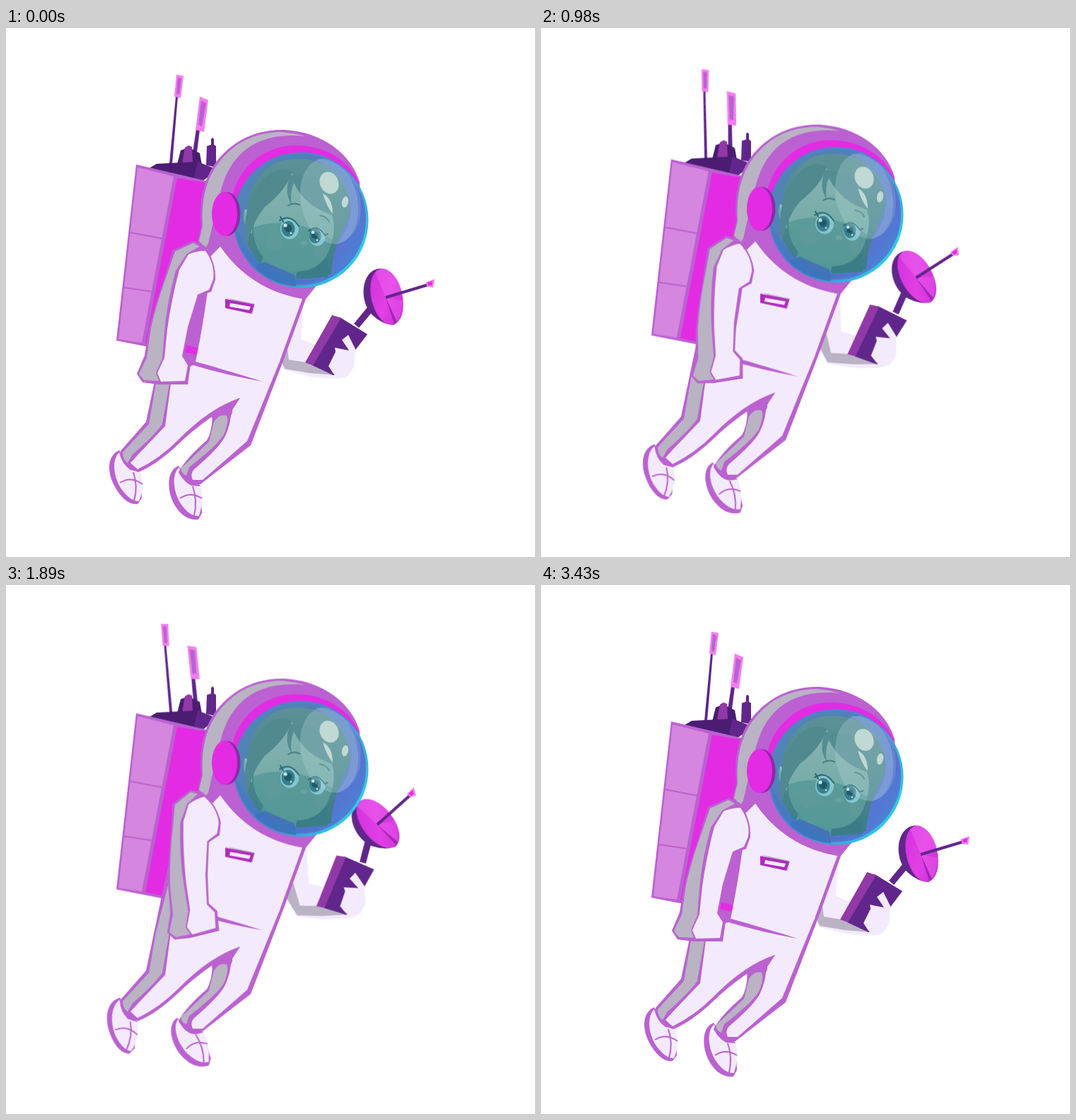
Write an HTML page without scripts that moves like this. It is 748 px wide and 748 px high and loops after 3.5 s.

```html
<!DOCTYPE html>
<html lang="en">
<head>
<meta charset="utf-8">
<title>Floating astronaut</title>
<style>
html, body { margin: 0; width: 100%; height: 100%; overflow: hidden; background: #fff; }
svg { display: block; width: 100vw; height: 100vh; }

.float, .swing { animation: 3.5s linear infinite; }
.float { animation-name: float; }
.swing { animation-name: swing; }
.open, .shut { animation: open 3.5s step-end infinite; }
.shut { animation-name: shut; }

.aerial-a { --turn: -11.2deg; transform-origin: 233px 191px; }
.aerial-b { --turn: -15deg; transform-origin: 267px 172px; }
.near-arm { --turn: -15.5deg; transform-origin: 265px 320px; }
.far-arm { --turn: -9deg; transform-origin: 380px 356px; }
.dish { --turn: -19deg; transform-origin: 497px 418px; }
.left-boot { --turn: 10.5deg; transform-origin: 172px 603px; }
.right-boot { --turn: -15deg; transform-origin: 262px 630px; }

/* Up and back again, with a short rest before the loop restarts. */
@keyframes float { 0%, 98%, 100% { transform: translateY(0); } 49% { transform: translateY(-13px); } }
@keyframes swing { 0%, 98%, 100% { transform: rotate(0); } 49% { transform: rotate(var(--turn)); } }
@keyframes open { 0%, 54% { opacity: 1; } 44% { opacity: 0; } }
@keyframes shut { 0%, 54% { opacity: 0; } 44% { opacity: 1; } }

.white { fill: #f3ebfd; }
.purple { fill: #bb61d1; }
.lilac { fill: #d586de; }
.hot { fill: #e32be3; }
.pink { fill: #f47df0; }
.grey { fill: #b9b3c4; }
.dark { fill: #61268b; }
.deep { fill: #4a1d73; }
.plum { fill: #9139a6; }
.line { fill: none; stroke: #bb61d1; stroke-width: 2; }
.rod { fill: none; stroke: #61268b; }
.lash { fill: none; stroke: #2b6874; stroke-width: 2; stroke-linecap: round; }
</style>
</head>
<body>
<svg viewBox="0 0 748 748">
  <defs>
    <linearGradient id="glass" x1="0" y1="0" x2="1" y2=".8">
      <stop offset="0" stop-color="#4f8ab4"/>
      <stop offset=".45" stop-color="#537cbc"/>
      <stop offset=".8" stop-color="#5873cf"/>
      <stop offset="1" stop-color="#4a83d8"/>
    </linearGradient>
    <linearGradient id="rim" x1="0" y1="0" x2="1" y2=".6">
      <stop offset="0" stop-color="#5c78c6"/>
      <stop offset=".6" stop-color="#4a86d2"/>
      <stop offset="1" stop-color="#2fc8e6"/>
    </linearGradient>
    <linearGradient id="hair" x1="0" y1="0" x2="0" y2="1">
      <stop offset="0" stop-color="#5d9197"/>
      <stop offset="1" stop-color="#3c7c86"/>
    </linearGradient>
    <linearGradient id="skin" x1="0" y1="0" x2="0" y2="1">
      <stop offset="0" stop-color="#88b4b1"/>
      <stop offset="1" stop-color="#68a5a1"/>
    </linearGradient>
    <linearGradient id="bowl" x1="0" y1="0" x2="1" y2="1">
      <stop offset="0" stop-color="#cf2fdc"/>
      <stop offset=".5" stop-color="#e23fe4"/>
      <stop offset="1" stop-color="#c52ad3"/>
    </linearGradient>
    <clipPath id="pane"><ellipse cx="417" cy="271.500" rx="93.500" ry="94"/></clipPath>
    <clipPath id="face"><path id="head" d="M350 290C349 266 360 244 384 230Q398 220 404 205Q420 246 460 263Q468 281 459 307C451 337 426 348 400 343C372 338 353 319 350 290Z"/></clipPath>
  </defs>

  <g class="float">
    <!-- Pack -->
    <g class="swing aerial-a">
      <path class="dark" d="M231 192L240 97H243L235 192Z"/>
      <path class="pink" d="M241 66L251 68L247 99L238 97Z"/>
      <path class="purple" d="M243 70L248 71L245 94L241 93Z"/>
    </g>
    <g class="swing aerial-b">
      <path class="dark" d="M264 176L269 143L274 144L270 176Z"/>
      <path class="pink" d="M274 97L286 102L280 147L268 144Z"/>
      <path class="purple" d="M276 103L283 106L277 139L272 137Z"/>
    </g>
    <path class="dark" d="M284 167L290 165V157L292 155L294 157V165L297 167V197L283 194Z"/>
    <path class="deep" d="M242 193L247 173L258 169L274 177L277 194Z"/>
    <path class="plum" d="M249 191L253 169L258 166L263 168L264 191Z"/>
    <path class="deep" d="M203 198L213 192L271 189L297 202L277 217Z"/>
    <path class="dark" d="M271 189L296 199L277 217L266 211Z"/>
    <path class="purple" d="M184 193L287 217V300L222 455L156 442Z"/>
    <path class="lilac" d="M186 197L237 210L192 445L159 440Z"/>
    <path class="hot" d="M242 212L284 219L278 300L221 451L197 446Z"/>
    <path class="line" d="M175 289L222 298M167 367L208 373"/>

    <!-- Far arm and hand dish -->
    <g class="swing far-arm">
      <path class="white" d="M385 372L421 380L417 440L435 447L470 450L491 458Q496 478 483 492Q472 499 430 493L394 484L376 440Z"/>
      <path class="grey" d="M391 420L395 435L400 469L438 475L466 491L430 488L394 482L376 440Z"/>
      <g class="swing dish">
        <path class="dark" d="M492 418L511 395L519 400L499 424Z"/>
        <path class="dark" d="M530 340C502 341 498 386 518 406Q533 420 549 420Z"/>
        <ellipse cx="538.500" cy="380" rx="22" ry="40.500" transform="rotate(-13 538.500 380)" fill="url(#bowl)"/>
        <path d="M537 381L522 345L530 340Q551 343 560 371Z" fill="#f06bf1" opacity=".4"/>
        <path d="M537 381L561 386Q560 410 550 417Z" fill="#f06bf1" opacity=".35"/>
        <path d="M537 381L553 416L549 419Z" fill="#a127b5"/>
        <path class="rod" stroke-width="4" d="M537 381L597 363"/>
        <path class="pink" d="M593 360L606 355L604 367L596 366Z"/>
        <path class="hot" d="M596 360L603 358L602 364L597 364Z"/>
      </g>
      <path class="dark" d="M472 409L511 433L492 458L463 491L433 477Z"/>
      <path class="plum" d="M461 406L474 410L434 477L423 473Z"/>
      <path class="white" d="M463 489L456 478L466 458L465 452L485 456L475 441L484 434L494 454L492 480L481 492Z"/>
    </g>

    <!-- Boots -->
    <g class="swing left-boot">
      <path class="purple" d="M160 597C143 605 143 627 152 645C162 665 175 675 186 673L192 665L190 626L175 618Z"/>
      <path class="white" d="M160 600C149 611 152 636 164 653Q177 670 188 669Q192 660 194 646L190 627L176 625Q164 617 160 600Z"/>
      <path class="line" stroke-width="1.500" d="M161 643Q177 633 193 645M180 628Q187 648 181 669"/>
    </g>
    <g class="swing right-boot">
      <path class="purple" d="M244 619C228 625 227 650 236 670C245 688 258 697 272 695L277 686L275 647L260 640Z"/>
      <path class="white" d="M245 621C233 632 237 658 248 674Q260 691 273 690Q277 677 278 663L275 648L262 647Q248 640 245 621Z"/>
      <path class="line" stroke-width="1.500" d="M246 665Q261 655 277 665M264 648Q271 668 266 690"/>
    </g>

    <!-- Suit -->
    <path class="purple" d="M285 300L424 383L393 468L346 590L275 645Q257 652 244 628Q254 609 284 583Q291 572 292 549Q262 570 242 590Q212 618 187 628Q164 622 162 598L198 557L228 414L250 350Z"/>
    <path class="grey" d="M232 425L247 430L231 503L221 560Q209 577 179 603L172 615Q165 611 165 600L202 560L212 503Z"/>
    <path class="white" d="M233 503L256 480L267 476L364 490L388 469L341 584L278 639L264 639Q260 630 266 624Q300 595 309 579Q319 558 318 541L331 523Q288 537 243 583Q217 609 186 624L176 615L185 605L225 563Z"/>
    <path class="purple" d="M331 523Q310 531 290 549L294 556L303 548L315 552Q321 545 320 540Z"/>
    <path class="grey" d="M294 557Q301 545 312 548Q316 555 308 575Q298 591 259 621L255 633Q246 629 248 622L287 585Z"/>
    <path class="hot" d="M254 448L272 453L269 462L252 458Z"/>
    <path class="white" d="M303 308Q343 369 419 383L386 474L363 498L268 472Q279 420 288 350L288 323Z"/>
    <path class="purple" d="M264 471Q316 485 363 500Q312 491 262 476Z"/>
    <path class="grey" d="M310 381L352 390L348 406L346 394Z"/>
    <path d="M310 383L351 391L347 404L310 396Z" fill="#b02cbd"/>
    <path class="white" d="M317 389L346 394L344 399L316 394Z"/>

    <!-- Helmet -->
    <path class="purple" d="M271 302L276 280C271 224 290 187 325 163Q355 143 394 144C448 147 489 179 500 218L505 300L441 362L424 383C380 378 335 355 303 309L289 323Z"/>
    <path class="grey" d="M273 301L278 280C275 224 292 191 327 165Q355 147 390 147Q411 149 423 153Q361 147 329 181C302 211 303 242 291 283L286 305L282 311Z"/>
    <path class="hot" d="M319 244C324 205 359 166 410 166C452 166 486 189 499 219L480 240L350 270Z"/>
    <ellipse cx="417" cy="271.500" rx="95.500" ry="96" fill="url(#rim)"/>
    <ellipse cx="416" cy="270.500" rx="93" ry="93" fill="url(#glass)"/>
    <g clip-path="url(#pane)">
      <path d="M341 306C344 291 338 275 341 254C344 216 371 186 409 185C458 183 492 220 486 264C479 286 463 302 460 348L416 354L356 330Z" fill="url(#hair)"/>
      <path d="M364 322L357 344L407 361L414 336Z" fill="#4f959b"/>
      <path d="M353 336L366 331L408 349L411 369H350Z" fill="#4474b6"/>
      <path d="M412 340L455 326V352L411 355Z" fill="#3b7d87"/>
      <path d="M348 278Q338 243 336 264Q336 284 348 291Z" fill="#6fa8b1"/>
      <path d="M339 257L342 273" stroke="#9ac4d0" stroke-width="2"/>
      <use href="#head" fill="url(#skin)"/>
      <g clip-path="url(#face)">
        <path d="M340 286Q401 258 470 305V350H340Z" fill="#458f8f" opacity=".55"/>
        <circle cx="378" cy="302" r="13" fill="#6b999b" opacity=".3"/>
        <circle cx="446" cy="317" r="11" fill="#6b999b" opacity=".3"/>
      </g>
      <path d="M404 203Q398 228 366 253Q348 275 341 307Q332 270 350 233Q374 190 404 203Z" fill="#518990"/>
      <path d="M402 208Q392 232 404 250Q401 233 407 219Q423 253 463 265Q449 246 437 212Z" fill="#558c93"/>
      <path class="lash" stroke-width="1.500" opacity=".7" d="M399 251Q407 246 415 250M444 265Q453 266 457 274"/>

      <g class="open">
        <ellipse cx="401" cy="284" rx="13" ry="14.500" fill="#86c6cf"/>
        <ellipse cx="440" cy="295" rx="11.500" ry="13" fill="#86c6cf"/>
        <g fill="#397f8c">
          <ellipse cx="399" cy="284" rx="9.500" ry="11"/>
          <ellipse cx="437" cy="294" rx="8.500" ry="10.500"/>
        </g>
        <g fill="#205a69">
          <circle cx="399" cy="283" r="5.500"/>
          <circle cx="437" cy="293" r="5"/>
        </g>
        <g fill="#c4e6e5">
          <circle cx="395" cy="279" r="2.600"/>
          <circle cx="434" cy="289" r="2.300"/>
          <circle cx="403" cy="290" r="1.300"/>
          <circle cx="440" cy="300" r="1.300"/>
        </g>
        <path class="lash" d="M388 267L392 274M387 272Q402 262 414 280M428 287Q440 276 451 293L455 291"/>
      </g>
      <path class="lash shut" d="M387 269Q392 275 398 275M389 277L398 275Q406 267 413 280M431 289Q440 282 449 293L455 291M449 293L453 298"/>
      <ellipse cx="421" cy="304" rx="5" ry="3.500" fill="#74aba5" opacity=".6"/>

      <ellipse cx="457" cy="245" rx="40" ry="61" transform="rotate(-12 457 245)" fill="#b4d8d8" opacity=".3"/>
      <path d="M438 185C480 186 507 219 501 267Q495 298 466 307Q491 279 487 246Q480 211 438 185Z" fill="#91b5e2" opacity=".28"/>
      <path d="M322 279C333 345 391 377 447 354Q381 368 336 304Z" fill="#3478c8" opacity=".4"/>
    </g>
    <g fill="#c0d9d4">
      <ellipse cx="457" cy="219" rx="13" ry="16" transform="rotate(-25 457 219)"/>
      <ellipse cx="479.500" cy="246" rx="4.500" ry="8" transform="rotate(12 479.500 246)"/>
      <path d="M448 234Q462 241 462 263Q453 252 448 234Z"/>
    </g>
    <ellipse cx="312" cy="263" rx="19.500" ry="31" fill="#9226aa"/>
    <ellipse cx="309" cy="263" rx="18" ry="31" class="hot"/>

    <!-- Near arm -->
    <g class="swing near-arm">
      <path class="purple" d="M236 314L265 301L281 308Q297 331 296 356L290 373L273 379L260 424L252 463L261 476L257 504L215 504L193 501L185 489L196 463L202 426Q211 389 220 366Z"/>
      <path class="grey" d="M239 316L265 304L274 309L256 319L240 343Q227 391 224 430L221 467L212 488L216 499L195 498L188 489L199 466L205 424Q214 385 229 345Z"/>
      <path class="white" d="M258 320Q270 315 282 315Q296 335 293 356L287 370L271 377L257 423L249 464L257 477L253 499L219 500L214 488L224 466L228 426Q234 383 245 342Z"/>
    </g>
  </g>
</svg>
</body>
</html>
```
